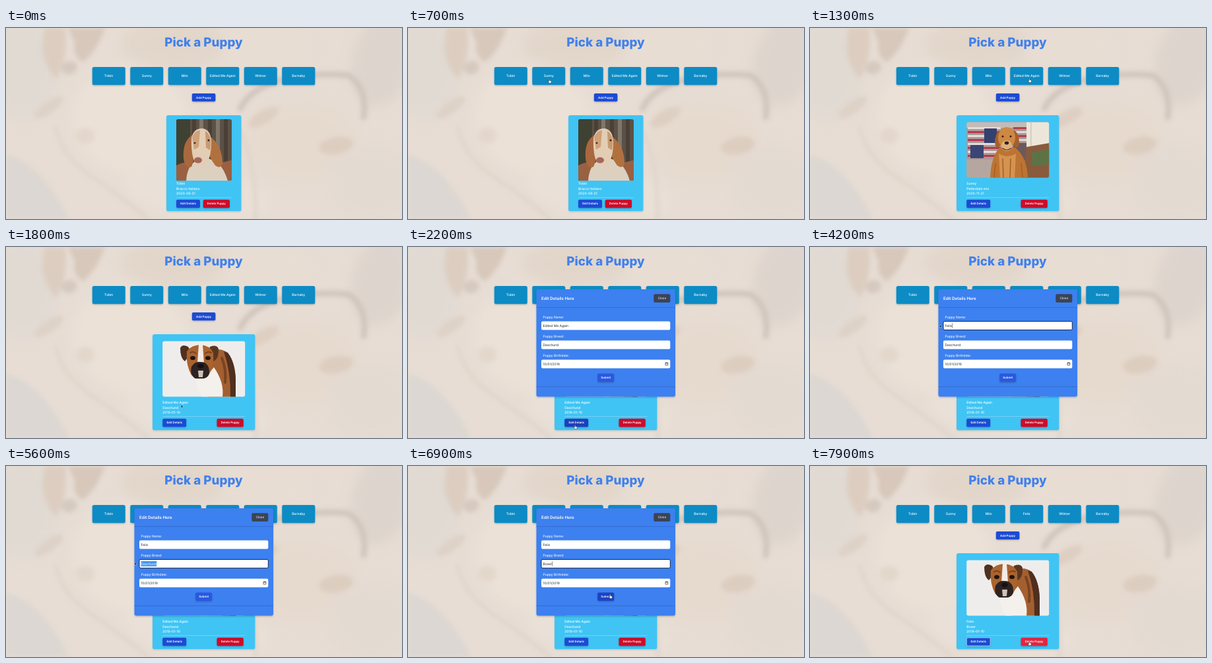
An HTML page for the animation above (8000 ms loop, 600 px wide and 289 px high).

```html
<!DOCTYPE html>
<html lang="en">
<head>
<meta charset="utf-8">
<title>Pick a Puppy</title>
<style>
html, body { margin: 0; width: 100%; height: 100%; overflow: hidden; background: #e7ddd4; }
svg { display: block; }
#stage { width: 600px; height: 289px; }
text { font-family: Inter, sans-serif; font-size: 5px; font-weight: 500; fill: #fff; text-rendering: geometricPrecision; white-space: pre; }
.mid { text-anchor: middle; }
.small { font-size: 4.375px; font-weight: 600; }
.dark { fill: #1f2937; font-weight: 400; }
</style>
</head>
<body>
<svg id="stage" viewBox="0 0 600 289"></svg>
<script>
const LOOP = 8000, STEP = 100;
const BLUE = '#1f4bd3', RED = '#cb0b2b';
const stage = document.getElementById('stage');
const $ = id => document.getElementById(id);

const rect = (x, y, w, h, fill, r = 0, more = '') =>
  `<rect x="${x}" y="${y}" width="${w}" height="${h}" rx="${r}" fill="${fill}" ${more}/>`;
const text = (x, y, s, cls = '', more = '') => `<text x="${x}" y="${y}" class="${cls}" ${more}>${s}</text>`;
const oval = (x, y, rx, ry, fill, turn = 0) =>
  `<ellipse cx="${x}" cy="${y}" rx="${rx}" ry="${ry}" fill="${fill}" transform="rotate(${turn} ${x} ${y})"/>`;
const path = (d, fill) => `<path d="${d}" fill="${fill}"/>`;
const line = (d, color, w) => `<path d="${d}" fill="none" stroke="${color}" stroke-width="${w}" stroke-linecap="round"/>`;
const button = (x, y, w, label, fill, id = '') =>
  rect(x, y, w, 12.4, fill, 2, `filter="url(#shade)" ${id && `id="${id}"`}`) +
  text(x + w / 2, y + 7.6, label, 'mid small');

function backdrop() {
  return rect(0, 0, 600, 289, '#e7ddd4') + '<g filter="url(#blur9)">' +
    oval(25, 60, 55, 80, '#e1dad3') +
    oval(190, 140, 90, 80, '#ebe1d7', 25) +
    oval(255, 25, 80, 35, '#e2d6ca') +
    oval(395, 30, 70, 28, '#e8ddd3') +
    oval(290, 250, 110, 38, '#e9e0d7', 8) +
    oval(450, 175, 85, 65, '#e6dacf') +
    oval(555, 235, 70, 60, '#e3dad2') +
    oval(570, 50, 45, 70, '#ddd4cd', 15) +
    '</g><g filter="url(#blur4)">' +
    path('M0 192Q55 205 95 289H0Z', '#dcd7d2') +
    path('M58 0H90Q94 48 76 76Q58 60 55 30Z', '#dccdc0') +
    path('M94 0H150Q138 35 116 52Q100 42 104 22Z', '#d7c8bb') +
    oval(96, 60, 12, 10, '#d6c9bf', -20) +
    oval(65, 120, 26, 9, '#ded2c7', -35) +
    oval(120, 163, 14, 12, '#e3d7cb') +
    oval(500, 178, 26, 13, '#dccdbf', -10) +
    oval(390, 135, 26, 10, '#decfc2', -30) +
    line('M355 122Q372 88 425 77T520 72Q548 92 542 135', '#d0c6be', 9) +
    line('M75 150Q85 195 130 225T215 289', '#dfd3c8', 4) +
    line('M350 150Q380 195 378 289', '#e1d6cc', 6) +
    '</g>';
}

const photos = {
  hound: rect(258, 138, 84, 93, '#5c5146') +
    rect(258, 138, 21, 93, '#3f4132') +
    [282, 293, 306, 318, 330].map((x, i) => rect(x, 138, 6, 70, i % 2 ? '#81766a' : '#4b4037')).join('') +
    path('M258 208Q278 197 300 210L342 200V231H258Z', '#9a6042') +
    path('M273 231Q275 200 300 197Q326 197 336 231Z', '#ddd0bf') +
    path('M282 162Q267 172 269 197Q271 214 281 210Q287 196 287 178Z', '#a9683d') +
    path('M306 162Q328 176 328 205Q325 214 317 208Q307 195 303 178Z', '#b1713f') +
    path('M281 166Q285 151 298 152Q311 154 311 174Q311 193 305 203Q297 213 287 205Q280 193 281 166Z', '#e3cdb5') +
    path('M282 165Q287 154 294 155L292 180L285 184Z', '#cfa27a') +
    path('M302 156Q313 162 309 185L303 181Z', '#c89a70') +
    oval(291, 200, 6, 4.6, '#a4685b') + oval(286, 174, 1.5, 1.3, '#3b251b') + oval(307, 170, 1.6, 1.4, '#3b251b'),
  golden: rect(237, 142, 126, 85, '#a99a97') +
    rect(237, 142, 93, 9, '#c5bbb6') +
    [0, 1, 2, 3, 4, 5, 6, 7].map(i => rect(239, 150 + i * 6, 50, 3, i % 2 ? '#b9384a' : '#e7dcdc')).join('') +
    rect(264, 152, 19, 22, '#34406e') + rect(243, 177, 20, 20, '#3a4574') +
    [0, 1, 2, 3].map(i => rect(308, 150 + i * 6, 21, 3, i % 2 ? '#e5d8d6' : '#b3404c')).join('') +
    rect(308, 174, 22, 26, '#6b5a5c') +
    rect(328, 142, 35, 38, '#ece6da') + rect(334, 142, 1.5, 38, '#cfc6b8') +
    path('M328 180L363 174V227H322Z', '#8a5a3c') + path('M336 188L363 183V206L336 209Z', '#5d7346') +
    path('M237 199H278V227H237Z', '#b5a79f') +
    path('M273 227Q274 196 287 181H311Q329 196 330 227Z', '#bd7433') +
    path('M286 190Q299 198 312 190L310 227H288Z', '#d4944f') +
    line('M292 198L293 226M304 198L303 226M281 205L279 226M320 205L322 226', '#a35d27', 1.5) +
    oval(286, 168, 5.5, 13, '#a65f2b', 10) + oval(311, 168, 5.5, 13, '#a65f2b', -10) +
    oval(298, 166, 13, 16, '#ce8843') + oval(298, 178, 8, 8, '#e0b07a') +
    oval(298, 174, 3.3, 2.4, '#35211b') + oval(292, 164, 1.5, 1.5, '#2d1a12') + oval(304, 164, 1.5, 1.5, '#2d1a12') +
    line('M292 182Q298 187 304 182', '#5c3023', 1.2),
  boxer: rect(237, 142, 126, 85, '#efedec') +
    path('M306 160Q322 150 336 160Q347 174 348 200V227H306Z', '#a45f30') +
    path('M336 160Q347 174 348 200V227H340Q341 190 330 158Z', '#4f2f20') +
    line('M327 168Q334 185 332 205', '#7a4322', 4) +
    path('M286 196Q302 200 315 182Q331 205 328 227H297Q289 214 286 196Z', '#f4f0ec') +
    path('M276 151Q267 146 264 153Q264 168 271 173L281 160Z', '#4f3021') +
    path('M309 151Q319 147 322 154Q323 168 315 173L306 160Z', '#5a3621') +
    path('M274 158Q281 148 295 148Q309 149 314 160Q316 180 307 194Q295 202 281 194Q272 178 274 158Z', '#a9632f') +
    path('M292 148H298L300 176H290Z', '#f3ece5') +
    path('M281 181Q287 172 295 174Q303 173 307 182Q311 196 300 199H287Q278 194 281 181Z', '#2e2320') +
    path('M291 187H299L298 197H292Z', '#cfc2ba') +
    oval(295, 180, 5, 3.5, '#141113') + oval(283, 168, 4, 3, '#20130f') + oval(306, 168, 4, 3, '#20130f') +
    line('M279 160Q284 157 288 161M302 161Q306 157 311 160', '#6a3a1c', 1.6)
};

function card(id, x, w, px, py, pw, ph, lines) {
  const right = id === 'hound' ? 298.7 : 319.5;
  return `<g id="${id}">` + rect(x, 132, w, 145.3, '#41c4f4', 3, 'filter="url(#faint)"') +
    `<clipPath id="${id}Clip">${rect(px, py, pw, ph, '#000', 3)}</clipPath>` +
    `<g clip-path="url(#${id}Clip)">${photos[id]}</g>` +
    lines.map((s, i) => text(px, 237.3 + i * 7.5, s, '', `id="${id}Line${i}"`)).join('') +
    rect(px, 256.4, pw, .5, '#a9def3') +
    button(px, 259.8, 36, 'Edit Details', BLUE, id + 'Edit') +
    button(right, 259.8, 40.3, 'Delete Puppy', RED, id + 'Delete') + '</g>';
}

const field = (id, y, label, value) =>
  text(204.5, y - 4.5, label, '', 'fill-opacity=".92"') +
  rect(202, y, 195.3, 13, '#fff', 2, `id="${id}Box"`) +
  rect(204.4, y + 2.6, 0, 7.8, '#3f95f3', 0, `id="${id}Mark"`) +
  text(204.5, y + 8.3, value, 'dark', `id="${id}"`) +
  rect(0, y + 3, .5, 7, '#111', 0, `id="${id}Caret"`);

function modal() {
  return '<g id="modal">' + rect(194.5, 64, 210.5, 162.6, '#3e80ef', 3, 'filter="url(#shade)"') +
    rect(194.5, 91.2, 210.5, .6, '#2d62c4') + rect(194.5, 211, 210.5, .6, '#2d62c4') +
    text(202, 79.7, 'Edit Details Here', '', 'style="font-size:6.25px;font-weight:600"') +
    rect(372.3, 71.3, 25, 12.6, '#3b4454', 2) +
    text(384.8, 79.2, 'Close', 'mid', 'style="font-size:4.7px" fill-opacity=".85"') +
    field('name', 112.5, 'Puppy Name:', '') + field('breed', 141.4, 'Puppy Breed:', '') +
    field('birth', 170.4, 'Puppy Birthdate:', '10/01/2019') +
    '<path d="M390 175.3h3.8v3.6h-3.8zM390 175.8h3.8M391 174.6v.7M392.8 174.6v.7" fill="none" stroke="#111" stroke-width=".6"/>' +
    button(287.2, 191.6, 25, 'Submit', '#2a59df', 'submit') + '</g>';
}

const pups = ['Tobin', 'Sunny', 'Milo', 'Edited Me Again', 'Wilmer', 'Barnaby'];
const blur = (id, size) =>
  `<filter id="${id}" x="-20%" y="-20%" width="140%" height="140%"><feGaussianBlur stdDeviation="${size}"/></filter>`;
const shadow = (id, alpha) => `<filter id="${id}" x="-20%" y="-20%" width="140%" height="150%">
  <feDropShadow dx="0" dy="1.2" stdDeviation="1.2" flood-color="#000" flood-opacity="${alpha}"/></filter>`;

stage.innerHTML = '<defs>' + blur('blur9', 9) + blur('blur4', 3.2) +
  shadow('shade', .22) + shadow('faint', .12) + '</defs>' + backdrop() +
  text(299.5, 28, 'Pick a Puppy', 'mid', 'style="font-size:18.75px;font-weight:800;fill:#3f80ee"') +
  pups.map((s, i) => {
    const x = 130.75 + i * 57.5;
    return rect(x, 58.9, 50, 27.4, '#0b8bc4', 2.5, 'filter="url(#shade)"') +
      text(x + 25, 74.3, s, 'mid', `id="pup${i}"`);
  }).join('') +
  button(281.8, 98.9, 35.6, 'Add Puppy', BLUE, 'add') +
  card('hound', 243, 113.5, 258, 138, 84, 93, ['Tobin', 'Bracco Italiano', '2020-09-21']) +
  card('golden', 222, 155.4, 237.2, 142.4, 125, 84, ['Sunny', 'Patterdale mix', '2020-11-21']) +
  card('boxer', 222, 155.4, 237.2, 142.4, 125, 84, ['', '', '2019-01-10']) +
  modal() + `<g id="mouse">
  <path id="arrow" d="M0 0V4.6L1.1 3.6 1.8 5.2 2.5 4.9 1.8 3.4H3.2Z" fill="#111" stroke="#fff" stroke-width=".35"/>
  <path id="hand" d="M-.6.5Q0-.5.6.5V2.5L2.7 3Q3.4 3.3 3.2 4.2L2.7 6.4H-.2L-2 3.7Q-1.7 3-.6 3.9Z" fill="#fff" stroke="#111" stroke-width=".45"/>
  <path id="beam" d="M-1-2.5Q0-2.5 0-1.8Q0-2.5 1-2.5M0-1.8V1.8M-1 2.5Q0 2.5 0 1.8Q0 2.5 1 2.5" fill="none" stroke="#111" stroke-width=".5"/>
  </g>`;

// time, x, y
const route = [
  [0, 190, -8], [100, 190, -8], [600, 214, 77], [900, 214, 77], [1300, 332.3, 76],
  [1500, 332.3, 76], [1900, 253, 269], [2700, 253, 269], [3100, 243, 119], [3200, 243, 119],
  [3500, 196.5, 117.5], [4400, 196.5, 117.5], [4900, 234, 147], [5100, 234, 147], [5400, 195, 145.5],
  [6500, 195, 145.5], [6900, 306.3, 194], [7200, 306.3, 194], [7700, 332, 265], [8000, 332, 265]
];
const OPEN = 2100, SAVE = 7200;

function mouseAt(t) {
  const i = route.findIndex(p => p[0] > t), a = route[i - 1], b = route[i];
  let k = (t - a[0]) / (b[0] - a[0]);
  k = k * k * (3 - 2 * k);
  return [a[1] + (b[1] - a[1]) * k, a[2] + (b[2] - a[2]) * k];
}

const show = (id, on) => $(id).setAttribute('display', on ? 'inline' : 'none');
const set = (id, key, value) => $(id).setAttribute(key, value);
const typed = (t, start, before, after) =>
  t < start ? before : after.slice(0, 1 + Math.floor((t - start) / 100));

function edit(id, value, focus, picked, drag, mx) {
  const el = $(id);
  el.textContent = value;
  const w = el.getComputedTextLength();
  const from = picked ? 204.5 : Math.max(204.5, Math.min(204.5 + w, mx));
  const size = drag ? 204.5 + w - from : 0;
  set(id + 'Mark', 'x', from);
  set(id + 'Mark', 'width', Math.max(0, size));
  el.style.fill = picked ? '#fff' : '#1f2937';
  set(id + 'Caret', 'x', 204.8 + w);
  show(id + 'Caret', focus && !drag);
  set(id + 'Box', 'stroke', focus ? '#15171c' : 'none');
  set(id + 'Box', 'stroke-width', .9);
}

function render(t) {
  const [x, y] = mouseAt(t);
  const over = (a, b, w, h) => x >= a && x <= a + w && y >= b && y <= b + h;
  const open = t >= OPEN && t < SAVE, saved = t >= SAVE;

  show('hound', t < 800);
  show('golden', t >= 800 && t < 1500);
  show('boxer', t >= 1500);
  show('modal', open);
  $('pup3').textContent = $('boxerLine0').textContent = saved ? 'Felix' : 'Edited Me Again';
  $('boxerLine1').textContent = saved ? 'Boxer' : 'Daschund';

  const onEdit = over(237.2, 259.8, 36, 12.4), onDelete = over(319.5, 259.8, 40.3, 12.4);
  const onSubmit = open && over(287.2, 191.6, 25, 12.4);
  set('boxerEdit', 'fill', onEdit ? '#1c40bb' : BLUE);
  set('boxerEdit', 'stroke', saved ? '#dceafb' : 'none');
  set('boxerEdit', 'stroke-width', .7);
  set('boxerDelete', 'fill', onDelete ? '#e0283f' : RED);
  set('submit', 'fill', onSubmit ? '#1d43c2' : '#2a59df');

  edit('name', typed(t, 3700, 'Edited Me Again', 'Felix'), t >= 3200 && t < 5100,
    t >= 3500 && t < 3700, t > 3200 && t < 3700, x);
  edit('breed', typed(t, 5900, 'Daschund', 'Boxer'), t >= 5100,
    t >= 5400 && t < 5900, t > 5100 && t < 5900, x);
  show('birthCaret', false);

  const onPup = !open && pups.some((_, i) => over(130.75 + i * 57.5, 58.9, 50, 27.4));
  const onInput = open && [112.5, 141.4, 170.4].some(top => over(202, top, 195.3, 13));
  const onAdd = !open && over(281.8, 98.9, 35.6, 12.4);
  const hand = onPup || onEdit || onDelete || onSubmit || onAdd;
  show('hand', hand);
  show('beam', onInput);
  show('arrow', !hand && !onInput);
  set('mouse', 'transform', `translate(${x} ${y})`);
}

let last = -1;
function tick() {
  const t = Math.floor(performance.now() % LOOP / STEP) * STEP;
  if (t !== last) render(last = t);
  requestAnimationFrame(tick);
}
tick();
</script>
</body>
</html>
```
